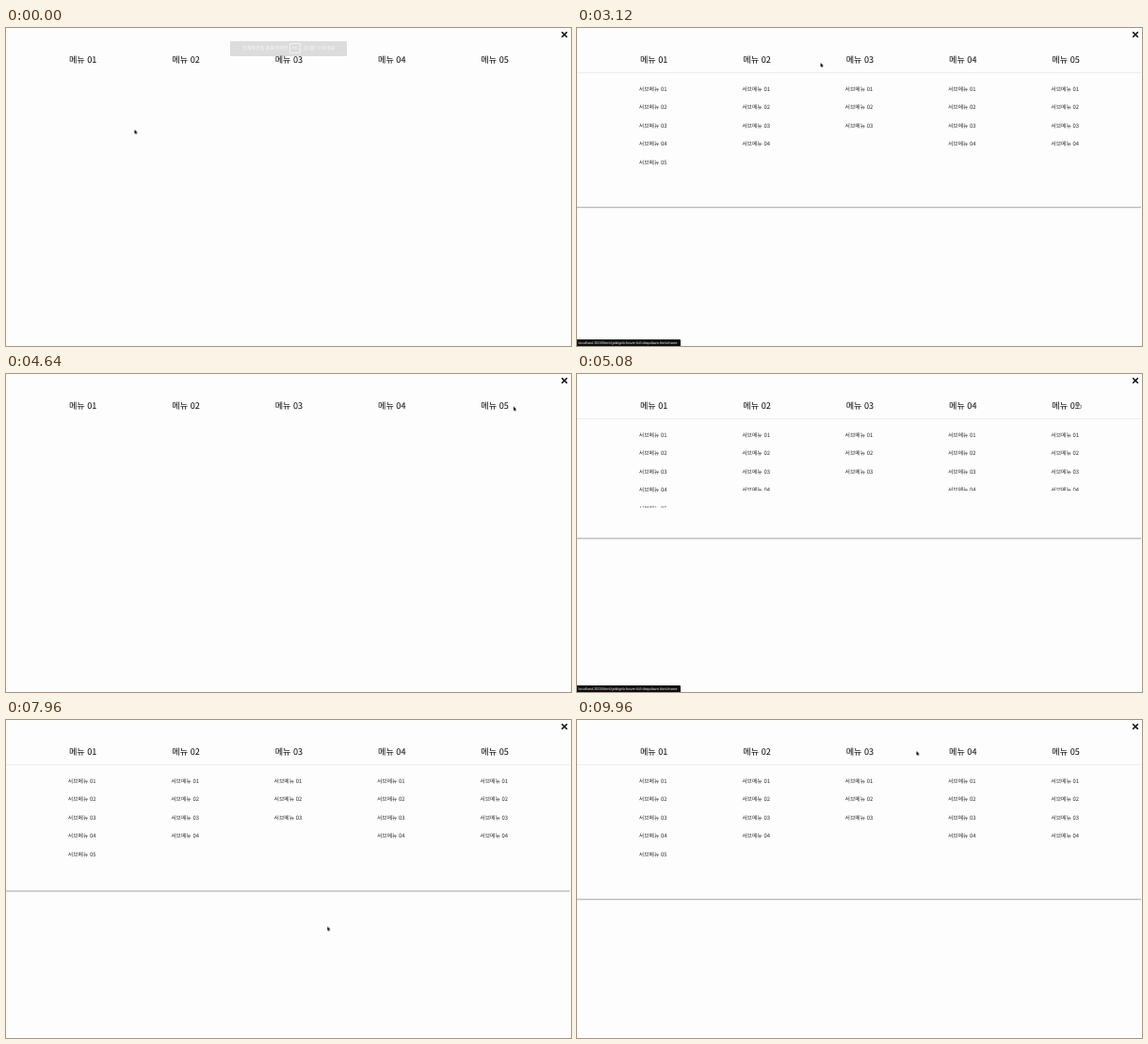
Animation of 600 by 338 pixels, one loop 10 s. Source, as an HTML page:

```html
<!DOCTYPE html>
<html lang="ko">
<head>
<meta charset="utf-8">
<title>Full dropdown menu</title>
<style>
  @property --open { syntax: "<number>"; inherits: true; initial-value: 0; }
  @property --hand { syntax: "<number>"; inherits: true; initial-value: 0; }

  html, body { margin: 0; width: 100%; height: 100%; overflow: hidden; }
  .stage {
    --row: 19.55px;
    position: relative; width: 600px; height: 338px; overflow: hidden;
    background: #fefdfe; color: #050505;
    font-family: "Noto Sans CJK KR", "Noto Sans CJK", sans-serif;
    text-rendering: geometricPrecision; white-space: nowrap;
    animation: open 10s infinite;
  }
  .stage * { position: absolute; box-sizing: border-box; }

  .border { top: 47px; left: 0; width: 599px; height: 1px; background: #ededee; }
  .edge {
    top: 47px; left: 0; width: 599px; height: 1px; background: #b9b9ba;
    box-shadow: 0 .5px 1px rgba(0, 0, 0, .16);
    transform: translateY(calc(var(--open) * 143px));
  }
  .border, .edge { opacity: calc(var(--open) * 1000); }

  .menu {
    top: 23px; width: 60px; margin-left: -30px;
    font-size: 9.15px; line-height: 20px; text-align: center;
  }
  .sub {
    top: 54.8px; width: 60px; margin-left: -30px; overflow: hidden;
    height: calc(var(--count) * var(--row) * var(--open));
    font-size: 5.87px; line-height: var(--row); text-align: center; color: #2b2b2b;
  }
  .sub span { position: static; display: block; height: var(--row); }

  .close { left: 589px; top: 3px; width: 8px; height: 8px; }
  .notice {
    left: 238px; top: 14px; width: 124px; height: 16px;
    background: rgba(0, 0, 0, .13); color: #f6f6f6;
    font-size: 5.1px; line-height: 15px;
    animation: fade 10s infinite linear;
  }
  .notice .key {
    left: 63px; top: 2px; width: 12px; height: 11px;
    border: .7px solid #f3f3f3; border-radius: 1px;
    line-height: 9px; text-align: center; font-size: 4.6px;
  }
  .status {
    left: 0; top: 331px; width: 109.5px; height: 7px; padding-left: 1.5px;
    background: #0c0c0c; color: #f2f2f2; border-radius: 0 1px 0 0;
    font: 3.95px/7px "Liberation Sans", Arial, sans-serif;
    animation: status 10s infinite step-end;
  }
  .cursor {
    left: 0; top: 0; width: 1px; height: 1px; overflow: visible;
    animation: move 10s infinite linear, hand 10s infinite step-end;
  }
  .arrow { opacity: calc(1 - var(--hand)); }
  .pointer { opacity: var(--hand); }

  @keyframes open {
    0%, 9.76% { --open: 0; animation-timing-function: cubic-bezier(.364, 0, .636, 1); }
    14.76%, 35.24% { --open: 1; animation-timing-function: cubic-bezier(.364, 0, .636, 1); }
    43.24%, 46.89% { --open: 0; animation-timing-function: cubic-bezier(.364, 0, .636, 1); }
    51.89%, 78.34% { --open: 1; animation-timing-function: cubic-bezier(.364, 0, .636, 1); }
    86.34% { --open: 0; animation-timing-function: cubic-bezier(.364, 0, .636, 1); }
    91.3%, 100% { --open: 1; }
  }
  @keyframes fade {
    0%, .7% { opacity: 1; }
    3.2%, 100% { opacity: 0; }
  }
  @keyframes status {
    0% { opacity: 0; }
    13.2% { opacity: 1; }
    32.8% { opacity: 0; }
    50% { opacity: 1; }
    58.4% { opacity: 0; }
    89.2% { opacity: 1; }
    94.8%, 100% { opacity: 0; }
  }
  @keyframes hand {
    0% { --hand: 0; }
    10% { --hand: 1; }
    17.6% { --hand: 0; }
    22.8% { --hand: 1; }
    26.8% { --hand: 0; }
    46.8% { --hand: 1; }
    51.6% { --hand: 0; }
    86% { --hand: 1; }
    94% { --hand: 0; }
    100% { --hand: 0; }
  }
  @keyframes move {
    0%, .7% { transform: translate(136.5px, 108px); }
    3.2%, 5% { transform: translate(125.5px, 104px); }
    7.6% { transform: translate(112px, 76px); }
    9.8% { transform: translate(95px, 42px); }
    11.6%, 17% { transform: translate(93px, 31px); }
    20% { transform: translate(130px, 29px); }
    24.4%, 25.8% { transform: translate(196px, 34px); }
    31.2%, 31.8% { transform: translate(258.6px, 37px); }
    35.2% { transform: translate(330px, 22px); }
    36.6% { transform: translate(372px, 24px); }
    40.8% { transform: translate(549px, 44.6px); }
    43.4% { transform: translate(562px, 46px); }
    46.8% { transform: translate(536px, 33px); }
    50.8% { transform: translate(533px, 31px); }
    53% { transform: translate(500px, 23px); }
    56%, 57.4% { transform: translate(449px, 31px); }
    60.8%, 62.2% { transform: translate(448px, 92px); }
    65.6% { transform: translate(402px, 168px); }
    69% { transform: translate(337px, 148px); }
    72%, 72.6% { transform: translate(343px, 73.5px); }
    76%, 77.2% { transform: translate(343px, 127px); }
    78.34% { transform: translate(342px, 188px); }
    79.6%, 80.8% { transform: translate(341.3px, 219.5px); }
    86% { transform: translate(302px, 42px); }
    87.4% { transform: translate(298px, 26px); }
    91.2%, 92.8% { transform: translate(299px, 33px); }
    99.6%, 100% { transform: translate(360.5px, 33px); }
  }
</style>
</head>
<body>
<div class="stage">
  <div class="border"></div>
  <div class="edge"></div>
  <div id="nav"></div>
  <svg class="close" viewBox="0 0 8 8">
    <path d="M1.2 1.2 6.8 6.8M6.8 1.2 1.2 6.8" stroke="#000" stroke-width="1.5"/>
  </svg>
  <div class="notice">
    <span style="left:13px">전체화면을 종료하려면</span>
    <span class="key">esc</span>
    <span style="left:78px">을(를) 누르세요.</span>
  </div>
  <div class="status">localhost:3000/html/gnb/gnb-hover-full-dropdown.html#none</div>
  <svg class="cursor">
    <path class="arrow" d="M0 0V4.4L1 3.5 1.7 5.1 2.5 4.8 1.8 3.2H3.2Z"
      fill="#000" stroke="#fff" stroke-width=".35" paint-order="stroke"/>
    <path class="pointer" d="M-.6 .3Q0-.5 .5 .3V2L2.3 2.5Q2.8 2.7 2.6 3.6L2 5.6H-.6L-2 3.4Q-1.9 2.6-.6 3.4Z"
      fill="#fff" stroke="#222" stroke-width=".55"/>
  </svg>
</div>
<script>
  const pad = n => String(n).padStart(2, "0");
  const counts = [5, 4, 3, 4, 4];

  document.getElementById("nav").innerHTML = counts.map((count, i) => {
    const x = 81.7 + i * 109.35;
    const items = Array.from({ length: count }, (_, k) => `<span>서브메뉴 ${pad(k + 1)}</span>`);
    return `<div class="menu" style="left:${x}px">메뉴 ${pad(i + 1)}</div>
      <div class="sub" style="left:${x - 1}px;--count:${count}">${items.join("")}</div>`;
  }).join("");
</script>
</body>
</html>
```
